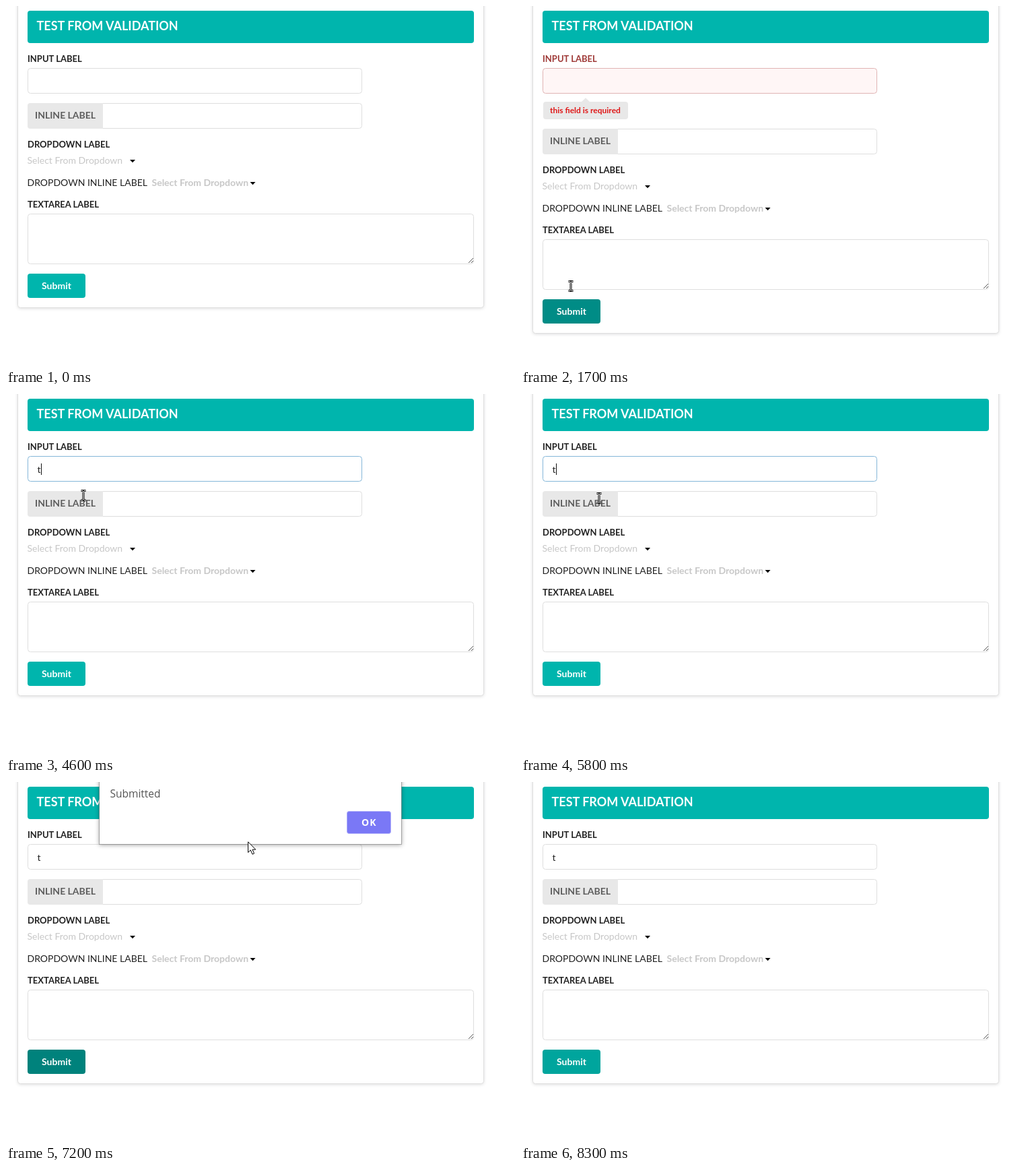
An HTML page for the animation above (8.4 s loop, 756 by 534 pixels).

```html
<!DOCTYPE html>
<html lang="en">
<head>
<meta charset="utf-8">
<title>Form validation</title>
<style>
  html, body { margin: 0; width: 100%; height: 100%; overflow: hidden; background: #fff; }
  svg { display: block; width: 756px; height: 534px; }
  text { font: 14px Lato, sans-serif; fill: rgba(0,0,0,.87); white-space: pre; }
  .bold { font-weight: 700; }
  .label { font-size: 13px; font-weight: 700; }
  .hint { fill: rgba(191,191,191,.87); }
  .white { fill: #fff; }
  .box { fill: #fff; stroke: #dedede; }
  .card { filter: drop-shadow(0 1px 2px rgba(34,36,38,.15)); }
  .panel { fill: #fff; stroke: rgba(0,0,0,.3); filter: drop-shadow(0 1px 3px rgba(0,0,0,.35)); }
  .system { font-family: "Open Sans", sans-serif; }
  .pointer { fill: #fff; stroke: #000; stroke-linejoin: round; }
</style>
</head>
<body>
<svg viewBox="0 0 756 534">
  <rect id="card" class="box card" x="17.5" y="-20.5" width="692" rx="4"/>
  <rect x="32" y="7" width="663" height="48" rx="4" fill="#00b5ad"/>
  <text class="bold white" x="45.5" y="36" style="font-size:18px">TEST FROM VALIDATION</text>

  <text id="inputLabel" class="label" x="32" y="83">INPUT LABEL</text>
  <rect id="input" class="box" x="32.5" y="92.5" width="496" height="37" rx="4"/>
  <text id="typed" x="46.5" y="117">t</text>
  <rect id="caret" y="103" width="1" height="17"/>

  <g id="message">
    <path d="M90 142l6-5.7 6 5.7z" fill="#e8e8e8"/>
    <rect x="33" y="142" width="126" height="26" rx="4" fill="#e8e8e8"/>
    <text class="bold" x="43" y="159" style="font-size:12px;fill:#df1616">this field is required</text>
  </g>

  <g id="lower">
    <path class="box" d="M143.5 144.5H524.5a4 4 0 0 1 4 4V177.5a4 4 0 0 1-4 4H143.5z"/>
    <path d="M144 144H36a4 4 0 0 0-4 4V178a4 4 0 0 0 4 4H144z" fill="#e8e8e8"/>
    <text class="bold" x="43" y="167" style="fill:rgba(0,0,0,.6)">INLINE LABEL</text>
    <text class="label" x="32" y="210">DROPDOWN LABEL</text>
    <text class="hint" x="31.5" y="234">Select From Dropdown</text>
    <path d="M184 228h8l-4 4.3z"/>
    <text x="31.5" y="267">DROPDOWN INLINE LABEL</text>
    <text class="hint bold" x="216.5" y="267">Select From Dropdown</text>
    <path d="M362.5 261h8l-4 4.3z"/>
    <text class="label" x="32" y="299">TEXTAREA LABEL</text>
    <rect class="box" x="32.5" y="308.5" width="662" height="74" rx="4"/>
    <path d="M687 381l7-7M691 381l3-3" stroke="#555"/>
    <rect id="button" x="32" y="397" width="86" height="36" rx="4"/>
    <text class="bold white" x="75" y="420" text-anchor="middle">Submit</text>
  </g>

  <g id="dialog">
    <path id="panel" class="panel"/>
    <text class="system" x="154.5" y="23" style="font-size:15.5px;fill:#555">Submitted</text>
    <rect x="506.5" y="43.5" width="65" height="33" rx="3" fill="#7a78f6" stroke="#b3b2fa"/>
    <text class="system bold white" x="528" y="65" style="letter-spacing:1px">OK</text>
  </g>

  <g id="cursor">
    <g id="arrow"><path class="pointer" d="M.6.8V16.5L4.3 13 7 19.2 9.6 18 7 12.2H11.8z"/></g>
    <g id="hand">
      <path class="pointer" d="M-1.5 9V1a1.5 1.5 0 0 1 3 0V5.5q2-.9 2.8.4 2-.7 2.7.6 2.4-.4 2.4 1.5V11l-1.4 5H-.5L-4.7 10.300q-.8-2.400 1.200-2.300z"/>
      <path d="M1.500 5.500v3M4.300 6v3M7 6.500v3M1.500 11v3M4 11v3M6.500 11v3" stroke="#000" fill="none"/>
    </g>
    <g id="beam" fill="none">
      <path d="M-3.500-6.500h2.500l1 1 1-1h2.500M0-5.500V6.500M-3.500 7.500h2.500l1-1 1 1h2.500" stroke="#000" stroke-width="3"/>
      <path d="M-3.500-6.500h2.500l1 1 1-1h2.500M0-5.500V6.500M-3.500 7.500h2.500l1-1 1 1h2.500" stroke="#fff"/>
    </g>
  </g>
</svg>
<script>
const LOOP = 8400, STEP = 100;
const $ = id => document.getElementById(id);
const TEAL = { base: '#00b5ad', hover: '#009c95', focus: '#008c86', active: '#00827c', fading: '#00a59d' };

// time, x, y, shape from that time on
const cursorPath = [
  [0, 0, 0, ''], [500, 100, 343, 'beam'], [800, 77, 411, 'hand'], [900, 74, 415, 'hand'],
  [1700, 74, 415, 'beam'], [2100, 74, 415, 'beam'], [2300, 90, 325, 'arrow'],
  [2600, 111, 140, 'arrow'], [2700, 113, 111, 'beam'], [2900, 113, 111, 'beam'], [3000, 105, 110, 'beam'],
  [3100, 103, 110, 'beam'], [4300, 103, 110, 'beam'], [4400, 111, 127, 'beam'],
  [4500, 111, 127, 'beam'], [4700, 118, 172, 'beam'], [4800, 121, 190, 'arrow'],
  [4900, 121, 190, 'arrow'], [5200, 121, 277, 'arrow'], [5400, 118, 184, 'arrow'],
  [5700, 118, 184, 'arrow'], [5800, 116, 154, 'beam'], [5900, 112, 275, 'arrow'],
  [6000, 100, 400, 'hand'], [6100, 92, 471, 'arrow'], [6200, 88, 420, 'hand'],
  [6300, 86, 412, 'hand'], [6700, 116, 100, 'arrow'], [6900, 116, 100, 'arrow'],
  [7000, 165, 98, 'arrow'], [7200, 359, 88, 'arrow'], [7400, 482, 65, 'arrow'],
  [7500, 482, 65, 'arrow'], [7700, 530, 60, 'arrow'], [8100, 530, 60, 'arrow'], [8200, 0, 0, '']
];
const buttonStates = [
  [0, 'base'], [800, 'hover'], [1500, 'active'], [1700, 'focus'], [3000, 'fading'],
  [3100, 'base'], [6200, 'hover'], [6400, 'active'], [8100, 'focus'], [8300, 'fading']
];
const dialogOpacity = [[0, 0], [6600, .33], [6700, .8], [6800, 1], [7900, .75], [8000, .33], [8100, 0]];

const indexAt = (list, t) => list.findLastIndex(entry => entry[0] <= t);
const valueAt = (list, t) => list[indexAt(list, t)][1];
const show = (id, on) => $(id).style.display = on ? '' : 'none';

function drawCursor(t) {
  const i = indexAt(cursorPath, t);
  const [t0, x0, y0, shape] = cursorPath[i];
  const [t1, x1, y1, next] = cursorPath[i + 1] || cursorPath[i];
  const k = next && t1 > t0 ? (t - t0) / (t1 - t0) : 0;
  // the pointer rests on the button until the dialog takes it over
  const moving = t0 === 6300 ? 0 : k;
  for (const id of ['arrow', 'hand', 'beam']) show(id, id === shape);
  $('cursor').setAttribute('transform',
    `translate(${Math.round(x0 + (x1 - x0) * moving)} ${Math.round(y0 + (y1 - y0) * moving)})`);
}

function drawForm(t) {
  const error = t >= 1700 && t < 4100;
  const typed = t >= 4100;
  const focused = t >= 3100 && t < 6400;
  const shift = error ? 38 : 0;
  const blinkStart = typed ? 4200 : 3100;
  const blinkOn = Math.max(0, t - blinkStart) % 1200 < 600;

  $('card').setAttribute('height', 468 + shift);
  $('lower').setAttribute('transform', `translate(0 ${shift})`);
  $('inputLabel').style.fill = error ? '#9f3a38' : '';
  $('input').style.fill = error ? '#fff6f6' : '';
  $('input').style.stroke = error ? '#e0b4b4' : focused ? '#85b7d9' : '';
  show('message', error);
  show('typed', typed);
  show('caret', focused && blinkOn);
  $('caret').setAttribute('x', typed ? 52 : 47);
  $('caret').style.fill = error ? '#9f3a38' : '#111';
  $('button').style.fill = TEAL[valueAt(buttonStates, t)];
}

function drawDialog(t) {
  const opacity = valueAt(dialogOpacity, t);
  const away = (1 - opacity) / .67;
  const flare = 3 * away;
  show('dialog', opacity > 0);
  $('dialog').style.opacity = opacity;
  $('dialog').setAttribute('transform', `translate(0 ${-13 * away})`);
  $('panel').setAttribute('d', `M138.500-20L${138.5 - flare} 92.500H${587.5 + flare}L587.500-20z`);
}

function frame(now) {
  const t = Math.floor(now % LOOP / STEP) * STEP;
  drawForm(t);
  drawDialog(t);
  drawCursor(t);
  requestAnimationFrame(frame);
}
requestAnimationFrame(frame);
</script>
</body>
</html>
```
